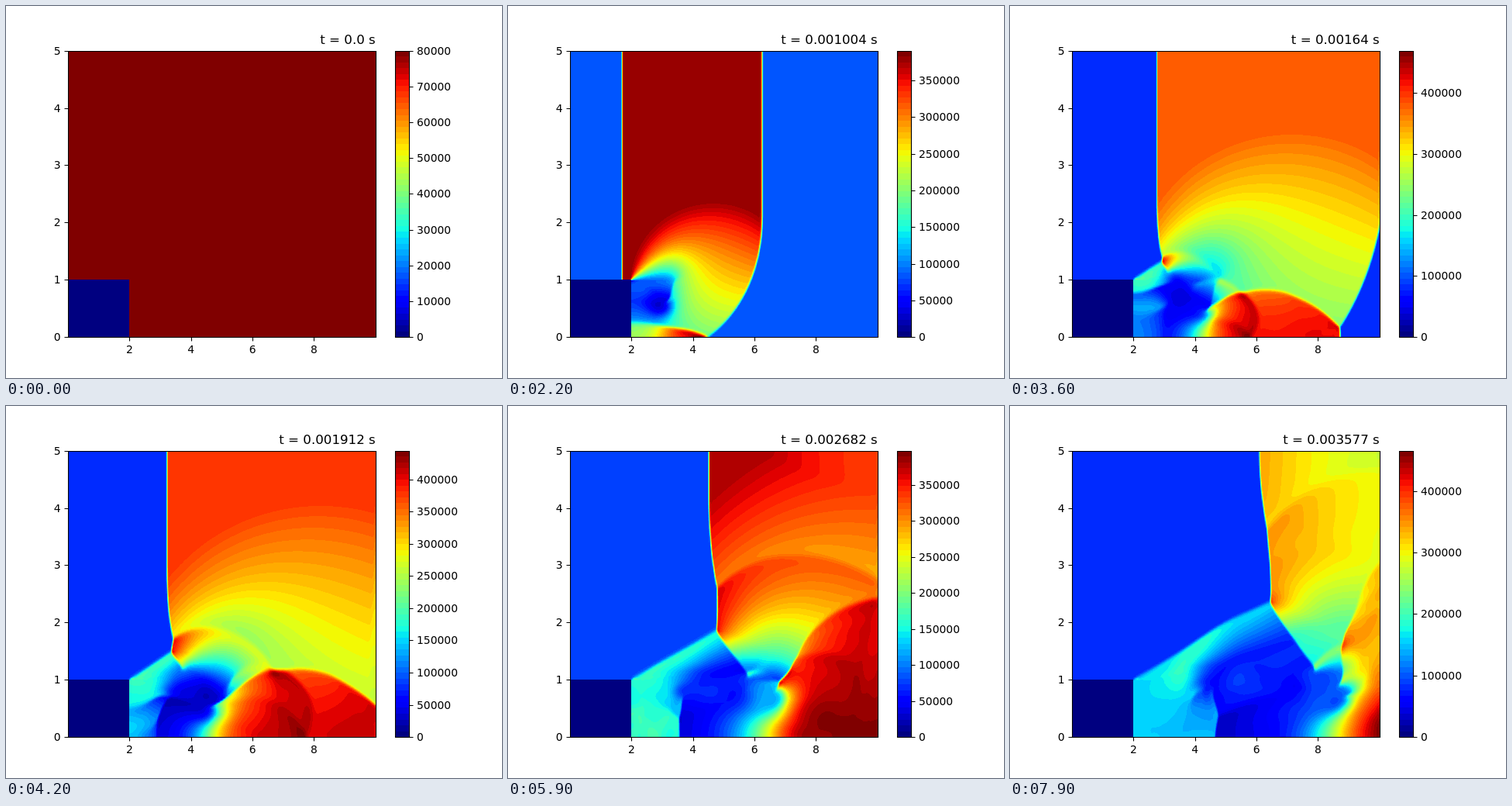
These frames come from a looping animation (640 by 480 pixels, 8000 ms). An HTML page with a canvas:

```html
<!DOCTYPE html>
<html lang="en">
<head>
<meta charset="utf-8">
<title>Shock over a step</title>
<style>
  html, body { margin: 0; width: 100%; height: 100%; overflow: hidden; background: #fff; }
  canvas, svg { position: absolute; left: 0; top: 0; width: 640px; height: 480px; }
  text { font: 13.89px "DejaVu Sans", sans-serif; }
  #title { font-size: 16.67px; }
  .end { text-anchor: end; }
  .mid { text-anchor: middle; }
  path { fill: none; stroke: #000; stroke-width: 1.1; }
</style>
</head>
<body>
<canvas id="view" width="640" height="480"></canvas>
<svg viewBox="0 0 640 480">
  <path id="axes"/>
  <g id="labels"></g>
  <text id="title" class="end" x="476.8" y="49"></text>
  <g id="scale"></g>
</svg>
<script>
// Flow: compressible gas on a regular grid, solid step in the lower left corner.
// The domain is 10 by 10; the vertical axis is labelled at half scale.
const GAMMA = 1.4, RHO = 0.0122, P0 = 80000, INFLOW = 7900;
const NX = 300, NY = 150, HX = 10 / NX, HY = 10 / NY;
const STEP_X = NX / 5, STEP_Y = NY / 5, SUBSTEPS = 22;
const FRAMES = 80, FRAME_MS = 100;
const KNOTS = [[0, 0], [11, 503], [30, 1368], [42, 1912], [59, 2682], [70, 3175], [79, 3577]];

const simTime = k => {
  const i = Math.max(1, KNOTS.findIndex(n => n[0] >= k));
  const [a, s] = KNOTS[i - 1], [b, e] = KNOTS[i];
  return Math.round(s + (e - s) * (k - a) / (b - a)) * 1e-6;
};

const grid = v => new Float64Array(NX * NY).fill(v);
const rho = grid(RHO), vx = grid(0), vy = grid(0), prs = grid(P0);

const line = () => new Float64Array(NX + 4);
const quad = () => [line(), line(), line(), line()];
const W = quad(), L = quad(), R = quad(), F = quad();

const slope = (a, b) => a * b > 0 ? 2 * a * b / (a + b) : 0;

// Face states from limited slopes, advanced by half a step
function reconstruct(m, half) {
  const [r, u, v, p] = W;
  for (let k = 1; k <= m + 2; k++) {
    const dr = slope(r[k] - r[k - 1], r[k + 1] - r[k]);
    const du = slope(u[k] - u[k - 1], u[k + 1] - u[k]);
    const dv = slope(v[k] - v[k - 1], v[k + 1] - v[k]);
    const dp = slope(p[k] - p[k - 1], p[k + 1] - p[k]);
    const rc = r[k] - half * (u[k] * dr + r[k] * du);
    const uc = u[k] - half * (u[k] * du + dp / r[k]);
    const vc = v[k] - half * u[k] * dv;
    const pc = p[k] - half * (GAMMA * p[k] * du + u[k] * dp);
    L[0][k] = Math.max(rc - dr / 2, 1e-5); R[0][k] = Math.max(rc + dr / 2, 1e-5);
    L[1][k] = uc - du / 2; R[1][k] = uc + du / 2;
    L[2][k] = vc - dv / 2; R[2][k] = vc + dv / 2;
    L[3][k] = Math.max(pc - dp / 2, 50); R[3][k] = Math.max(pc + dp / 2, 50);
  }
}

const energy = (r, u, v, p) => p / (GAMMA - 1) + 0.5 * r * (u * u + v * v);

// HLLC flux through every face
function fluxes(m) {
  const [f0, f1, f2, f3] = F;
  for (let k = 1; k <= m + 1; k++) {
    const rl = R[0][k], ul = R[1][k], pl = R[3][k];
    const rr = L[0][k + 1], ur = L[1][k + 1], pr = L[3][k + 1];
    const cl = Math.sqrt(GAMMA * pl / rl), cr = Math.sqrt(GAMMA * pr / rr);
    const sl = Math.min(ul - cl, ur - cr), sr = Math.max(ul + cl, ur + cr);
    const ml = rl * (sl - ul), mr = rr * (sr - ur);
    const sm = (pr - pl + ul * ml - ur * mr) / (ml - mr);
    const left = sm >= 0;
    const r = left ? rl : rr, u = left ? ul : ur, p = left ? pl : pr;
    const v = left ? R[2][k] : L[2][k + 1], s = left ? sl : sr;
    const e = energy(r, u, v, p);
    f0[k] = r * u; f1[k] = r * u * u + p; f2[k] = r * u * v; f3[k] = u * (e + p);
    if (left ? sl < 0 : sr > 0) {
      const q = r * (s - u) / (s - sm);
      const es = q * (e / r + (sm - u) * (sm + p / (r * (s - u))));
      f0[k] += s * (q - r);
      f1[k] += s * (q * sm - r * u);
      f2[k] += s * (q - r) * v;
      f3[k] += s * (es - e);
    }
  }
}

function setCell(k, r, u, v, p) {
  W[0][k] = r; W[1][k] = u; W[2][k] = v; W[3][k] = p;
}
const copyCell = (k, from, sign) => setCell(k, W[0][from], sign * W[1][from], W[2][from], W[3][from]);

// Boundaries: fill cell k of the line, given its mirror image inside the domain
const wall = (k, mirror) => copyCell(k, mirror, -1);
const outflow = (k, mirror) => copyCell(k, mirror, 1);
const inflow = k => setCell(k, RHO, INFLOW, 0, P0);

// Advance cells lo..hi of one row or column that spans min..max
function sweep(base, stride, [min, max], lo, hi, un, ut, ratio, before, after) {
  const m = hi - lo + 1, shift = 2 - lo;
  const from = Math.max(min, lo - 2), to = Math.min(max, hi + 2);
  for (let i = from; i <= to; i++) {
    const c = base + i * stride;
    setCell(i + shift, rho[c], un[c], ut[c], prs[c]);
  }
  for (let i = lo - 2; i < min; i++) before(i + shift, 2 * min - 1 - i + shift);
  for (let i = hi + 2; i > max; i--) after(i + shift, 2 * max + 1 - i + shift);
  reconstruct(m, ratio / 2);
  fluxes(m);
  const [f0, f1, f2, f3] = F;
  for (let k = 2; k < m + 2; k++) {
    const c = base + (k - shift) * stride;
    const r0 = W[0][k], u0 = W[1][k], v0 = W[2][k];
    const r = Math.max(r0 - ratio * (f0[k] - f0[k - 1]), 1e-5);
    const u = (r0 * u0 - ratio * (f1[k] - f1[k - 1])) / r;
    const v = (r0 * v0 - ratio * (f2[k] - f2[k - 1])) / r;
    const e = energy(r0, u0, v0, W[3][k]) - ratio * (f3[k] - f3[k - 1]);
    rho[c] = r; un[c] = u; ut[c] = v;
    prs[c] = Math.max((GAMMA - 1) * (e - 0.5 * r * (u * u + v * v)), 50);
  }
}

const PAD = 4;
const still = (c, u) => Math.abs(prs[c] - P0) < 1 && Math.abs(vx[c] - u) < 1 && Math.abs(vy[c]) < 1;

// Rows above this one are all alike
let topRow = STEP_Y + PAD;

function sweepRows(dt) {
  const max = NX - 1;
  for (let j = 0; j <= topRow; j++) {
    const low = j < STEP_Y, min = low ? STEP_X : 0, base = j * NX;
    let lo = min, hi = max;
    while (hi > min && still(base + hi, 0)) hi--;
    if (!low) while (lo < hi && still(base + lo, INFLOW)) lo++;
    lo = Math.max(min, lo - PAD);
    hi = Math.min(max, hi + PAD);
    sweep(base, 1, [min, max], lo, hi, vx, vy, dt / HX, low ? wall : inflow, outflow);
  }
  for (const a of [rho, vx, vy, prs])
    for (let j = topRow + 1; j < NY; j++) a.copyWithin(j * NX, topRow * NX, (topRow + 1) * NX);
}

function sweepColumns(dt) {
  const max = NY - 1;
  for (let i = 0; i < NX; i++) {
    const min = i < STEP_X ? STEP_Y : 0;
    let hi = max;
    while (hi > min) {
      const c = i + hi * NX;
      if (Math.abs(prs[c] - prs[c - NX]) > 1 || Math.abs(vy[c]) > 1) break;
      hi--;
    }
    if (hi === min) continue;
    hi = Math.min(max, hi + PAD);
    topRow = Math.max(topRow, hi);
    sweep(i, NX, [min, max], min, hi, vy, vx, dt / HY, wall, wall);
  }
}

const shots = [];
let done = 0;

// Keep a copy of the pressure, with the step's rim taking its neighbours' values
function snapshot() {
  for (let i = 0; i < STEP_X; i++) prs[(STEP_Y - 1) * NX + i] = prs[STEP_Y * NX + i];
  for (let j = 0; j < STEP_Y; j++) prs[j * NX + STEP_X - 1] = prs[j * NX + STEP_X];
  const p = Float32Array.from(prs);
  shots.push({ p, max: p.reduce((a, b) => Math.max(a, b)) });
}

function advance() {
  const k = shots.length - 1;
  const dt = (simTime(k + 1) - simTime(k)) / SUBSTEPS;
  const order = done % 2 ? [sweepColumns, sweepRows] : [sweepRows, sweepColumns];
  order.forEach(f => f(dt));
  if (++done % SUBSTEPS === 0) snapshot();
}

// Picture
const LEFT = 80, TOP = 57.6, BOTTOM = 427.2, WIDTH = 396.8, HEIGHT = BOTTOM - TOP;
const UNIT_X = WIDTH / 10, UNIT_Y = HEIGHT / 5, BANDS = 49;
const PW = 397, PH = 369;
const $ = id => document.getElementById(id);
const ctx = $("view").getContext("2d");
const img = ctx.createImageData(PW, PH);
const pixels = new Uint32Array(img.data.buffer);
const snap = v => Math.round(v) + 0.5;
const clamp = (v, max) => Math.min(max, Math.max(0, v));

const ramp = (x, pts) => {
  const i = Math.max(1, pts.findIndex(p => p[0] >= x));
  const [a, s] = pts[i - 1], [b, e] = pts[i];
  return Math.round(255 * (s + (e - s) * (x - a) / (b - a)));
};
const JET = [
  [[0, 0], [0.35, 0], [0.66, 1], [0.89, 1], [1, 0.5]],
  [[0, 0], [0.125, 0], [0.375, 1], [0.64, 1], [0.91, 0], [1, 0]],
  [[0, 0.5], [0.11, 1], [0.34, 1], [0.65, 0], [1, 0]]
];
const palette = Array.from({ length: BANDS }, (_, k) => JET.map(c => ramp(k / (BANDS - 1), c)));
const packed = palette.map(([r, g, b]) => (255 << 24 | b << 16 | g << 8 | r) >>> 0);

function drawField({ p, max }) {
  for (let y = 0; y < PH; y++) {
    const py = (BOTTOM - y - 58.5) / HEIGHT;
    const gy = clamp(py * NY - 0.5, NY - 1.001), j = gy | 0, fy = gy - j;
    for (let x = 0; x < PW; x++) {
      const px = (x + 0.5) / WIDTH;
      let band = 0;
      if (px > 0.2 || py > 0.2) {
        const gx = clamp(px * NX - 0.5, NX - 1.001), i = gx | 0, fx = gx - i;
        const c = j * NX + i;
        const a = p[c] + fx * (p[c + 1] - p[c]);
        const b = p[c + NX] + fx * (p[c + NX + 1] - p[c + NX]);
        band = Math.min(BANDS - 1, (a + fy * (b - a)) / max * BANDS | 0);
      }
      pixels[y * PW + x] = packed[band];
    }
  }
  ctx.putImageData(img, LEFT, 58);
}

function drawBar() {
  const h = HEIGHT / BANDS;
  palette.forEach((c, k) => {
    const y = Math.round(BOTTOM - (k + 1) * h);
    ctx.fillStyle = `rgb(${c})`;
    ctx.fillRect(502, y, 18, Math.round(BOTTOM - k * h) - y);
  });
}

const label = (x, y, cls, s) => `<text class="${cls}" x="${x}" y="${y}">${s}</text>`;

function drawAxes() {
  let d = "M80.5 58.5H477.5V427.5H80.5Z", text = "";
  for (let n = 0; n <= 5; n++) {
    const y = BOTTOM - n * UNIT_Y;
    d += `M75.5 ${snap(y)}H80`;
    text += label(70.5, Math.round(y + 5), "end", n);
  }
  for (let n = 2; n <= 8; n += 2) {
    const x = LEFT + n * UNIT_X;
    d += `M${snap(x)} 428V432.5`;
    text += label(x, 448, "mid", n);
  }
  $("axes").setAttribute("d", d);
  $("labels").innerHTML = text;
}

function drawScale(max) {
  const step = [10000, 20000, 25000, 50000, 100000, 200000].find(s => max / s <= 9);
  let d = "M502.5 58.5H520.5V427.5H502.5Z", text = "";
  for (let v = 0; v <= max; v += step) {
    const y = BOTTOM - v / max * HEIGHT;
    d += `M521 ${snap(y)}H525.5`;
    text += label(530, Math.round(y + 5), "", v);
  }
  $("scale").innerHTML = `<path d="${d}"/>` + text;
}

let shown = -1;
function show(k) {
  if (k === shown) return;
  while (shots.length <= k) advance();
  shown = k;
  drawField(shots[k]);
  drawScale(shots[k].max);
  $("title").textContent = `t = ${k ? +simTime(k).toFixed(6) : "0.0"} s`;
}

const start = performance.now();
function tick() {
  show(Math.floor((performance.now() - start) / FRAME_MS) % FRAMES);
  // Work ahead a little on every repaint
  for (let n = 0; n < 6 && shots.length < FRAMES; n++) advance();
  requestAnimationFrame(tick);
}

snapshot();
drawAxes();
drawBar();
tick();
</script>
</body>
</html>
```
